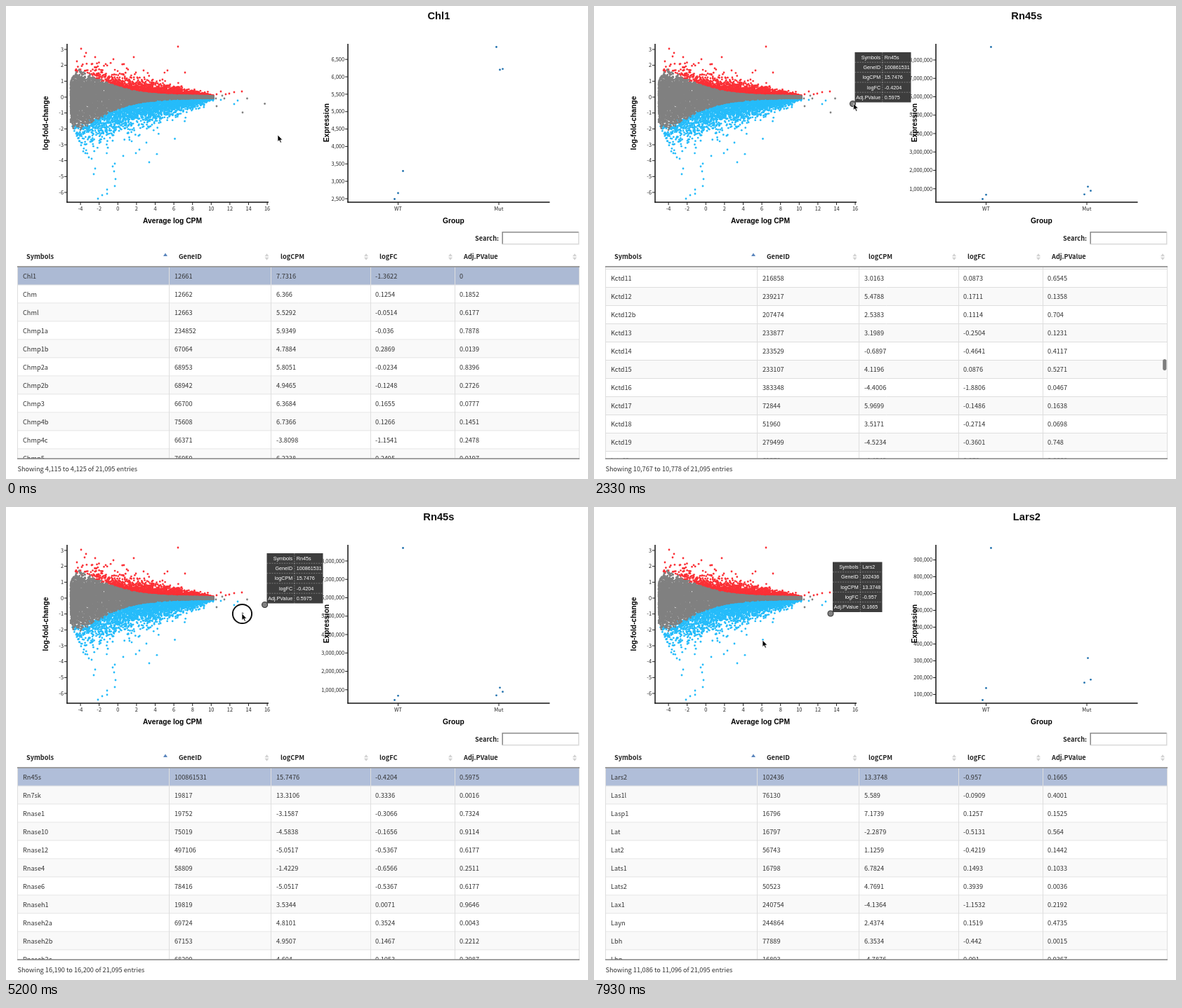
Write an HTML page with a canvas that moves like this. It is 829 px wide and 675 px high and loops after 8000 ms.

```html
<!DOCTYPE html>
<html lang="en">
<head>
<meta charset="utf-8">
<title>Expression explorer</title>
<style>
html, body { margin: 0; width: 100%; height: 100%; overflow: hidden; background: #fff; }
canvas { display: block; width: 829px; height: 675px; }
</style>
</head>
<body>
<canvas id="stage"></canvas>
<script>
const W = 829, H = 675, LOOP = 8000, FPS = 15, TOTAL = 21095;
const HUMANIST = '"Noto Sans CJK JP", "Noto Sans CJK SC", "Noto Sans CJK", "Noto Sans", sans-serif';
const GROTESK = '"Liberation Sans", Arial, sans-serif';
const FONT = {
  cell: '9.2px ' + HUMANIST,
  head: 'bold 9.2px ' + HUMANIST,
  tick: '7.4px ' + HUMANIST,
  axis: 'bold 10.25px ' + GROTESK,
  title: 'bold 14.7px ' + GROTESK,
  tip: '7.2px ' + GROTESK
};
const RED = '#fb3036', BLUE = '#26bcfa', GRAY = '#808080';
const dpr = window.devicePixelRatio || 1;

function makeCanvas(el) {
  el.width = Math.round(W * dpr);
  el.height = Math.round(H * dpr);
  const c = el.getContext('2d');
  c.scale(dpr, dpr);
  return c;
}
const ctx = makeCanvas(document.getElementById('stage'));

// ---------- drawing helpers ----------
function text(c, str, x, y, font, color = '#222', align = 'left') {
  c.font = font;
  c.fillStyle = color;
  c.textAlign = align;
  c.fillText(str, x, y);
}
function line(c, x1, y1, x2, y2, color, width = 1) {
  c.strokeStyle = color;
  c.lineWidth = width;
  c.beginPath();
  c.moveTo(x1, y1);
  c.lineTo(x2, y2);
  c.stroke();
}
function dot(c, x, y, r, color) {
  c.fillStyle = color;
  c.beginPath();
  c.arc(x, y, r, 0, Math.PI * 2);
  c.fill();
}
function rect(c, x, y, w, h, color) {
  c.fillStyle = color;
  c.fillRect(x, y, w, h);
}
function poly(c, pts, color) {
  c.beginPath();
  pts.forEach(([x, y]) => c.lineTo(x, y));
  c.closePath();
  c.fillStyle = color;
  c.fill();
}
function sideLabel(c, str, x, y) {
  c.save();
  c.translate(x, y);
  c.rotate(-Math.PI / 2);
  text(c, str, 0, 0, FONT.axis, '#000', 'center');
  c.restore();
}
function axes(c, left, right) {
  line(c, left, 54, left, 280.6, '#111', 1.5);
  line(c, left - 0.7, 280, right, 280, '#111', 1.5);
}
function xTick(c, x, label) {
  line(c, x, 280, x, 284, '#222');
  text(c, label, x, 291.9, FONT.tick, '#222', 'center');
}
function yTick(c, left, y, label) {
  line(c, left - 4, y, left, y, '#222');
  text(c, label, left - 5, y + 2.7, FONT.tick, '#222', 'right');
}

// ---------- mean-difference plot ----------
const px = cpm => 159.3 + cpm * 13.3;
const py = lfc => 130 - lfc * 22.67;

function random(seed) {
  return () => {
    seed = (seed + 0x6D2B79F5) | 0;
    let v = Math.imul(seed ^ (seed >>> 15), 1 | seed);
    v = (v + Math.imul(v ^ (v >>> 7), 61 | v)) ^ v;
    return ((v ^ (v >>> 14)) >>> 0) / 4294967296;
  };
}

function cloud(c) {
  const rnd = random(41);
  const groups = { [RED]: [], [BLUE]: [], [GRAY]: [] };
  for (let i = 0; i < 11500; i++) {
    const x = -5.05 + 15.3 * Math.pow(rnd(), 1.2);
    const bell = Math.sqrt(-2 * Math.log(1 - rnd())) * Math.cos(2 * Math.PI * rnd());
    const spread = 0.04 + 0.85 * (1 - Math.pow((x + 5.05) / 15.4, 1.2));
    let y = bell * spread * (rnd() < 0.05 ? 1.6 : 1);
    y *= y > 0 ? 0.82 : 1.45;
    // Points outside the narrowing band count as changed.
    const fall = Math.exp(-Math.pow(Math.max(0, x + 4) / 4, 1.3));
    const up = 0.07 + 1.55 * fall, down = -0.07 - 1.8 * fall;
    const floor = Math.max(-3.7, -1.6 - 1.42 * (x + 5.05));
    const roof = Math.min(2.3, 1 + 1.3 * (x + 5.05));
    if (y < floor || y > roof) continue;
    const soft = 1 + (rnd() - 0.5) * 0.25 * fall;
    groups[y > up * soft ? RED : y < down * soft ? BLUE : GRAY].push([px(x), py(y)]);
  }
  const add = (color, flat) => {
    for (let i = 0; i < flat.length; i += 2) groups[color].push([flat[i], flat[i + 1]]);
  };
  add(RED, [107, 61, 245, 58, 114, 67, 127, 73, 182, 73, 153, 76, 112, 72, 101, 79, 168, 83,
    230, 92, 255, 95, 196, 92, 122, 83, 185, 95, 300, 126, 306, 122, 313, 126, 318, 125, 325, 123, 336, 122]);
  add(BLUE, [131, 275, 137, 270, 144, 262, 144, 268, 155, 257, 156, 247, 125, 240, 127, 232,
    152, 229, 155, 225, 154, 236, 204, 223, 240.5, 189.5, 190, 205, 167, 214, 185, 210, 200, 195,
    118, 216, 122, 218, 113, 210, 306, 134, 325, 140, 330, 135]);
  add(GRAY, [300, 143, 299, 132, 308, 128, 311, 132, 343.5, 132, 368.6, 139.5, 337, 152]);
  for (const color in groups) groups[color].forEach(([x, y]) => dot(c, x, y, 1.4, color));
}

// Everything that never changes is painted once.
const COLS = [
  ['Symbols', 24, 227], ['GeneID', 240, 371.5], ['logCPM', 385, 513],
  ['logFC', 526, 633], ['Adj.PValue', 646, 810]
];
const backdrop = document.createElement('canvas');
(function paintBackdrop() {
  const c = makeCanvas(backdrop);
  rect(c, 0, 0, W, H, '#fff');
  cloud(c);
  axes(c, 87, 374);
  for (let v = -4; v <= 16; v += 2) xTick(c, px(v), String(v));
  for (let v = -6; v <= 3; v++) yTick(c, 87, py(v), String(v));
  text(c, 'Average log CPM', 237, 310.3, FONT.axis, '#000', 'center');
  sideLabel(c, 'log-fold-change', 59.5, 167);

  axes(c, 487, 774.5);
  xTick(c, 558.5, 'WT');
  xTick(c, 702, 'Mut');
  text(c, 'Group', 637.3, 310.3, FONT.axis, '#000', 'center');

  text(c, 'Search:', 702, 334.5, FONT.head, '#222', 'right');
  rect(c, 706.5, 322, 110, 18.5, '#dcdcdc');
  rect(c, 706.5, 322, 109, 17.5, '#8c8c8c');
  rect(c, 708, 323.5, 107.5, 16, '#fff');

  COLS.forEach(([name, x, icon], i) => {
    text(c, name, x + (i ? 6 : 5), 361.4, FONT.head);
    if (!i) {
      poly(c, [[icon - 3, 357], [icon, 352.5], [icon + 3, 357]], '#5b86bd');
      return;
    }
    poly(c, [[icon - 3, 357.3], [icon, 353.3], [icon + 3, 357.3]], '#d2d2d2');
    poly(c, [[icon - 3, 358.7], [icon, 362.7], [icon + 3, 358.7]], '#d2d2d2');
  });
})();

// ---------- strip charts ----------
const GROUP_X = [553.5, 558.5, 565.5, 698.5, 703.5, 707.5];
const CHARTS = {
  start: { title: 'Chl1', first: 2500, last: 6500, step: 500, y0: 275, y1: 76.2, dots: [275.5, 267, 235.5, 58.5, 91, 89.8] },
  high: { title: 'Rn45s', first: 1e6, last: 8e6, step: 1e6, y0: 260.8, y1: 77, dots: [275.5, 269.3, 58.5, 268.8, 257.8, 263.7] },
  mid: { title: 'Lars2', first: 1e5, last: 9e5, step: 1e5, y0: 267.5, y1: 75.5, dots: [275.5, 258.4, 58.5, 250.7, 215.6, 246.3] }
};
function drawChart(ch) {
  text(ctx, ch.title, 616.4, 19.4, FONT.title, '#111', 'center');
  for (let v = ch.first; v <= ch.last; v += ch.step) {
    const k = (v - ch.first) / (ch.last - ch.first);
    yTick(ctx, 487, ch.y0 + (ch.y1 - ch.y0) * k, v.toLocaleString('en-US'));
  }
  sideLabel(ctx, 'Expression', 460, 166.7);
  ch.dots.forEach((y, i) => dot(ctx, GROUP_X[i], y, 1.4, '#2272ae'));
}

// ---------- table ----------
const rows = {};
function addRows(start, block) {
  block.trim().split('\n').forEach((l, i) => { rows[start + i] = l.trim().split(' '); });
}
addRows(4115, `Chl1 12661 7.7316 -1.3622 0
  Chm 12662 6.366 0.1254 0.1852
  Chml 12663 5.5292 -0.0514 0.6177
  Chmp1a 234852 5.9349 -0.036 0.7878
  Chmp1b 67064 4.7884 0.2869 0.0139
  Chmp2a 68953 5.8051 -0.0234 0.8396
  Chmp2b 68942 4.9465 -0.1248 0.2726
  Chmp3 66700 6.3684 0.1655 0.0777
  Chmp4b 75608 6.7366 0.1266 0.1451
  Chmp4c 66371 -3.8098 -1.1541 0.2478
  Chmp5 76959 6.2238 0.2495 0.0197`);
addRows(10768, `Kctd11 216858 3.0163 0.0873 0.6545
  Kctd12 239217 5.4788 0.1711 0.1358
  Kctd12b 207474 2.5383 0.1114 0.704
  Kctd13 233877 3.1989 -0.2504 0.1231
  Kctd14 233529 -0.6897 -0.4641 0.4117
  Kctd15 233107 4.1196 0.0876 0.5271
  Kctd16 383348 -4.4006 -1.8806 0.0467
  Kctd17 72844 5.9699 -0.1486 0.1638
  Kctd18 51960 3.5171 -0.2714 0.0698
  Kctd19 279499 -4.5234 -0.3601 0.748`);
addRows(16190, `Rn45s 100861531 15.7476 -0.4204 0.5975
  Rn7sk 19817 13.3106 0.3336 0.0016
  Rnase1 19752 -3.1587 -0.3066 0.7324
  Rnase10 75019 -4.5838 -0.1656 0.9114
  Rnase12 497106 -5.0517 -0.5367 0.6177
  Rnase4 58809 -1.4229 -0.6566 0.2511
  Rnase6 78416 -5.0517 -0.5367 0.6177
  Rnaseh1 19819 3.5344 0.0071 0.9646
  Rnaseh2a 69724 4.8101 0.3524 0.0043
  Rnaseh2b 67153 4.9507 0.1467 0.2212
  Rnaseh2c 68209 4.604 0.1053 0.3987`);
addRows(11152, `Letm2 270035 0.5088 -0.2453 0.5017
  Letmd1 68614 4.813 -0.1561 0.1568
  Lfng 16848 7.0894 0.0723 0.4795
  Lgals1 16852 9.0455 0.512 0.0002
  Lgals12 56072 -5.0517 -0.6202 0.5862
  Lgals2 107753 0.8858 -0.0405 0.914
  Lgals3 16854 0.2073 -0.2225 0.5997
  Lgals3bp 19039 -1.401 -1.4951 0.0155
  Lgals4 16855 -2.2166 -0.5495 0.5473
  Lgals7 16858 -4.9289 1.0521 0.3209
  Lgals8 56048 4.1899 -0.1022 0.3856`);
addRows(11086, `Lars2 102436 13.3748 -0.957 0.1665
  Las1l 76130 5.589 -0.0909 0.4001
  Lasp1 16796 7.1739 0.1257 0.1525
  Lat 16797 -2.2879 -0.5131 0.564
  Lat2 56743 1.1259 -0.4219 0.1442
  Lats1 16798 6.7824 0.1493 0.1033
  Lats2 50523 4.7691 0.3939 0.0036
  Lax1 240754 -4.1364 -1.1532 0.2192
  Layn 244864 2.4374 0.1519 0.4735
  Lbh 77889 6.3534 -0.442 0.0015
  Lbp 16803 -4.7876 0.091 0.9367`);

const FAMILIES = 'Abc Arl Bmp Cdk Cox Dusp Fbxo Gpr Ints Krt Mapk Ndu Pde Rnf Slc Tmem Zfp'.split(' ');
function rowAt(i) {
  if (rows[i]) return rows[i];
  const r = random(i * 977);
  const num = (lo, hi) => String(+(lo + r() * (hi - lo)).toFixed(4));
  const family = FAMILIES[Math.floor(i / (TOTAL + 1) * FAMILIES.length)];
  return [family + (i % 90 + 1), String(Math.floor(12000 + r() * 90000)), num(-5, 9), num(-1, 0.6), num(0, 1)];
}

function drawTable(pos, selected, thumb) {
  const top = 372.5, bottom = 645.5, rowH = 26;
  ctx.save();
  ctx.beginPath();
  ctx.rect(16, top, 801, bottom - top);
  ctx.clip();
  for (let i = Math.floor(pos); i < pos + 10.6; i++) {
    const y = top + (i - pos) * rowH, odd = i % 2;
    rect(ctx, 16.5, y, 800, rowH, i === selected ? (odd ? '#acbad4' : '#b0bed9') : odd ? '#f9f9f9' : '#fff');
    line(ctx, 16, y + rowH - 0.5, 817, y + rowH - 0.5, '#dedede');
    rowAt(i).forEach((s, k) => text(ctx, s, COLS[k][1], y + 16.2, FONT.cell, '#333'));
  }
  [16.5, 232.5, 377.5, 519.5, 639.5, 816.5].forEach(x => line(ctx, x, top, x, bottom, '#dedede'));
  if (thumb > 0) {
    ctx.globalAlpha = thumb;
    ctx.fillStyle = '#7d7d7d';
    ctx.beginPath();
    ctx.roundRect(810.2, 373.3 + 256 * pos / TOTAL, 5.2, 16, 2.6);
    ctx.fill();
  }
  ctx.restore();
  line(ctx, 16, 372, 817, 372, '#444', 1.2);
  line(ctx, 16, 646, 817, 646, '#444', 1.2);
  const from = Math.floor(pos).toLocaleString('en-US');
  const to = (Math.ceil(pos + 10.5) - 1).toLocaleString('en-US');
  text(ctx, `Showing ${from} to ${to} of 21,095 entries`, 16.5, 664.4, FONT.cell, '#333');
}

// ---------- tooltip and pointer ----------
const TIPS = {
  high: { row: 16190, x: 371.5, y: 66, w: 80, split: 39.3, cx: 368.6, cy: 139.5 },
  mid: { row: 11086, x: 340, y: 78.5, w: 70.5, split: 39.3, cx: 337, cy: 152 }
};
function drawTip(tip) {
  const { x, y, w, split } = tip, h = 14.3, edge = 'rgba(255,255,255,.45)';
  dot(ctx, tip.cx, tip.cy, 4, GRAY);
  ctx.strokeStyle = '#333';
  ctx.lineWidth = 1.1;
  ctx.stroke();
  rect(ctx, x, y, w, h * 5, 'rgba(54,54,54,.96)');
  ctx.setLineDash([2, 1.5]);
  line(ctx, x + split, y, x + split, y + h * 5, edge, 0.7);
  for (let i = 1; i < 5; i++) line(ctx, x, y + h * i, x + w, y + h * i, edge, 0.7);
  ctx.setLineDash([]);
  rows[tip.row].forEach((s, i) => {
    const base = y + h * i + 9.6;
    text(ctx, COLS[i][0], x + split - 2.6, base, FONT.tip, '#fff', 'right');
    text(ctx, s, x + split + 3, base, FONT.tip, '#fff');
  });
}

const PATH = [
  [0, 387, 184], [100, 387, 184], [1200, 369.5, 139], [2700, 369.5, 139], [3400, 371.5, 160.5],
  [4100, 371.5, 160.5], [4950, 336, 152], [6300, 336, 152], [7800, 240, 190], [LOOP, 240, 190]
];
const TARGETS = [PATH[2], PATH[6], PATH[8]];
const swing = k => 0.5 - 0.5 * Math.cos(Math.PI * Math.min(1, Math.max(0, k)));

function pointerAt(t) {
  const i = PATH.findIndex((p, k) => k && t <= p[0]);
  const [t0, x0, y0] = PATH[i - 1], [t1, x1, y1] = PATH[i];
  const k = swing((t - t0) / (t1 - t0));
  return [x0 + (x1 - x0) * k, y0 + (y1 - y0) * k];
}
function drawPointer(t) {
  const [x, y] = pointerAt(t);
  const arrow = x > 374 || TARGETS.some(p => Math.hypot(p[1] - x, p[2] - y) < 4);
  if (!arrow) {
    line(ctx, x - 4.5, y, x + 4.5, y, '#222', 1.2);
    line(ctx, x, y - 4.5, x, y + 4.5, '#222', 1.2);
    return;
  }
  const shape = [[0, 0], [0, 9.6], [2.2, 7.6], [3.8, 11.2], [5.4, 10.5], [3.9, 7.1], [6.8, 7]];
  poly(ctx, shape.map(([a, b]) => [x + a, y + b]), '#000');
  ctx.strokeStyle = '#fff';
  ctx.lineWidth = 0.7;
  ctx.stroke();
}
function drawRing(x, y) {
  ctx.strokeStyle = '#111';
  ctx.lineWidth = 2;
  ctx.beginPath();
  ctx.arc(x, y, 13.6, 0, Math.PI * 2);
  ctx.stroke();
}

// ---------- timeline ----------
// An eased scroll that passes row `via` at time `at`.
function makeScroll(from, to, via, at, span = 500) {
  const phase = Math.acos(1 - 2 * (via - from) / (to - from)) / Math.PI;
  const begin = at - span * phase;
  return { begin, end: begin + span, pos: t => from + (to - from) * swing((t - begin) / span) };
}
const down = makeScroll(4115, 16190, 10767.865, 35000 / FPS);
const back = makeScroll(16190, 11086, 11151.9, 89000 / FPS);

function thumbAlpha(t, s) {
  if (t < s.begin) return 0;
  return Math.min(1, Math.max(0, 1 - (t - s.end - 450) / 280));
}

function draw(t) {
  const state = t >= 5260 ? 'mid' : t >= 1660 ? 'high' : 'start';
  const late = t >= back.begin;
  const scroll = late ? back : down;
  const selected = late ? 11086 : t >= down.begin ? 16190 : 4115;
  ctx.drawImage(backdrop, 0, 0, W, H);
  drawChart(CHARTS[state]);
  drawTable(scroll.pos(t), selected, thumbAlpha(t, scroll));
  if (t >= 1200) drawTip(TIPS[state === 'mid' ? 'mid' : 'high']);
  if (t >= 1530 && t < 1660) drawRing(369, 139.5);
  if (t >= 5130 && t < 5260) drawRing(336.5, 152.5);
  drawPointer(t);
}

// The picture advances at a fixed 15 steps per second.
const origin = performance.now();
function play() {
  const t = (performance.now() - origin) % LOOP;
  const step = Math.floor((t + 3.5) * FPS / 1000);
  draw((step * 1000 / FPS) % LOOP);
  requestAnimationFrame(play);
}
play();
</script>
</body>
</html>
```
